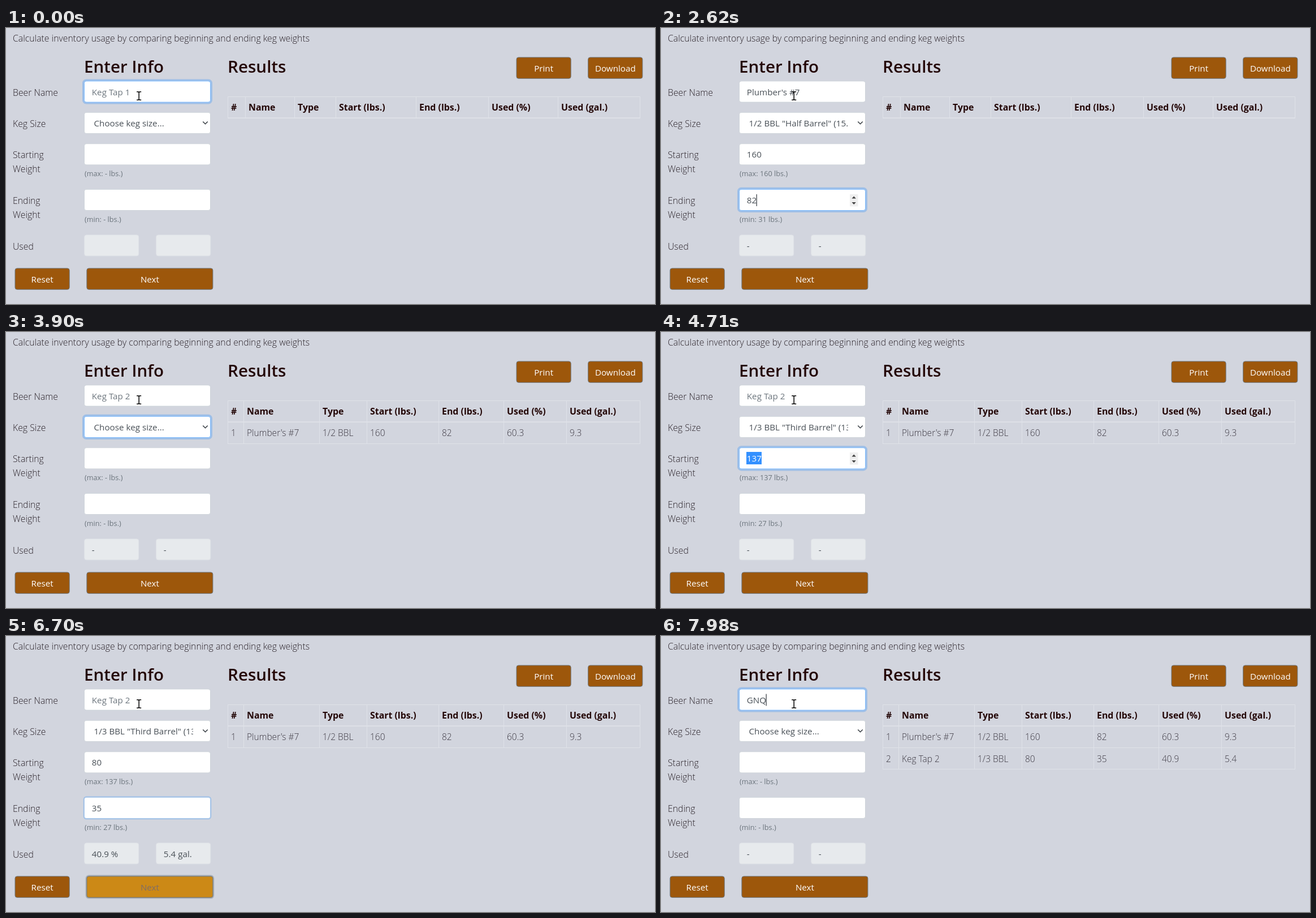
Recreate the animation shown at these times as an HTML page. Size 1148 by 488 pixels, loop 8000 ms.

```html
<!DOCTYPE html>
<html lang="en">
<head>
<meta charset="utf-8">
<title>Keg usage calculator</title>
<style>
  html, body { margin: 0; width: 100%; height: 100%; overflow: hidden; background: #d2d5de; }
  svg { display: block; }
  text { font: 400 15.2px "Open Sans", "Noto Sans", sans-serif; fill: #495057; white-space: pre; }
  .light { font-weight: 300; font-size: 15.8px; fill: #2a2229; }
  .cell { font-weight: 300; font-size: 15.5px; fill: #3e3a44; }
  .title { font-weight: 600; font-size: 29.6px; fill: #230606; }
  .head { font-weight: 700; font-size: 15.9px; fill: #230606; }
  .small { font-size: 12.7px; fill: #6c757d; }
  .btn { text-anchor: middle; fill: #fff; }
  .line { fill: none; stroke: #dfe2e8; }
</style>
</head>
<body>
<svg id="stage" width="1148" height="488" viewBox="0 0 1148 488">
  <defs><clipPath id="kegClip"><rect x="150" y="150" width="181" height="36"/></clipPath></defs>
</svg>
<script>
const stage = document.getElementById('stage');
const LOOP = 8000, BLINK = 210, TICK = 30;
const BEER = "Plumber's #7";

function add(tag, attrs, content, parent = stage) {
  const el = document.createElementNS('http://www.w3.org/2000/svg', tag);
  for (const key in attrs) el.setAttribute(key, attrs[key]);
  if (content) el.textContent = content;
  return parent.appendChild(el);
}
const label = (x, y, cls, content, parent) => add('text', { x, y, class: cls }, content, parent);
const show = (el, on) => el.setAttribute('visibility', on ? 'visible' : 'hidden');
const mix = (a, b, p) => `rgb(${a.map((v, i) => Math.round(v + (b[i] - v) * p))})`;

function box(x, y, width, height, fill, stroke, ringColor) {
  const shape = { x, y, width, height, rx: 4 };
  const ring = add('rect', { ...shape, fill: 'none', stroke: ringColor || 'none', 'stroke-width': 0 });
  const body = add('rect', {
    x: x + .5, y: y + .5, width: width - 1, height: height - 1, rx: 3.5, fill, stroke
  });
  return { ring, body };
}
const field = y => box(138, y, 224, 38.2, '#fff', '#ced4da', 'rgba(0,123,255,.25)');
function button(x, y, width, content) {
  const b = box(x, y, width, 38.4, '#9d570b', '#6c757d', 'rgba(130,138,145,.5)');
  b.text = label(x + width / 2, y + 25.6, 'btn', content);
  return b;
}

// Fixed labels
label(12, 24, 'light', 'Calculate inventory usage by comparing beginning and ending keg weights');
label(138, 79, 'title', 'Enter Info');
label(392, 79, 'title', 'Results');
[['Beer Name', 120], ['Keg Size', 175], ['Starting', 230], ['Weight', 255],
 ['Ending', 311], ['Weight', 336], ['Used', 392]].forEach(([s, y]) => label(12, y, 'light', s));

// Form
const fields = { name: field(93.4), keg: field(148.8), start: field(204.2), end: field(284.8) };
for (const x of [138.2, 265.2]) box(x, 365.4, 97, 38, '#e7eaed', '#dfe2e7');
button(15.5, 424.4, 97.2, 'Reset');
button(902.5, 51.4, 97.2, 'Print');
button(1029.2, 51.4, 97.2, 'Download');
fields.next = button(142.4, 424.4, 224, 'Next');

const mark = add('rect', { x: 151, y: 212, width: 27, height: 22, fill: '#3390ff' });
const texts = {
  name: label(151.8, 119),
  keg: label(155.5, 174),
  start: label(151.8, 229),
  end: label(151.8, 310),
  max: label(139, 262, 'small'),
  min: label(139, 343, 'small'),
  pct: label(151.8, 391),
  gal: label(278.8, 391)
};
texts.keg.setAttribute('clip-path', 'url(#kegClip)');
add('path', { d: 'M348.3 165.5l4.2 4.2 4.2-4.2', fill: 'none', stroke: '#343a40', 'stroke-width': 1.5 });

const spinner = add('g', {});
add('rect', { x: 334, y: 0, width: 14.5, height: 21.5, fill: '#efefef' }, '', spinner);
add('path', { d: 'M337.5 7.5l3.7-4 3.7 4zM337.5 14l3.7 4 3.7-4z', fill: '#404040' }, '', spinner);
const caret = add('rect', { width: 1.2, height: 21, fill: '#30363c' });

// Results table
function table(edges, bottoms) {
  const g = add('g', {});
  const last = bottoms[bottoms.length - 1];
  add('path', {
    class: 'line',
    d: `M392.5 121.5H1121.5V${last}H392.5Z` +
       edges.map(x => `M${x} 121.5V${last}`).join('') +
       bottoms.map(y => `M392.5 ${y}H1121.5`).join('')
  }, '', g);
  add('path', { class: 'line', 'stroke-width': 1.8, d: 'M392.5 159.2H1121.5' }, '', g);
  const cells = (y, cls, values) =>
    values.forEach((s, i) => label(i ? edges[i - 1] + 5.5 : 398, y, cls, s, g));
  cells(145.5, 'head', ['#', 'Name', 'Type', 'Start (lbs.)', 'End (lbs.)', 'Used (%)', 'Used (gal.)']);
  const rows = [
    ['1', BEER, '1/2 BBL', '160', '82', '60.3', '9.3'],
    ['2', 'Keg Tap 2', '1/3 BBL', '80', '35', '40.9', '5.4']
  ];
  rows.slice(0, bottoms.length - 1).forEach((r, i) => cells(184 + i * 38.7, 'cell', r));
  return g;
}
const wide = [420.5, 554.5, 638.5, 765.5, 880.5, 991.5];
const tables = [
  table([423.5, 510.5, 583.5, 725.5, 853.5, 976.5], [159.5]),
  table(wide, [159.5, 197.5]),
  table(wide, [159.5, 197.5, 235.5])
];

// Mouse pointer
add('path', {
  d: 'M231.2 112.8h2.8l1.2 1 1.2-1h2.8M235.2 113.5v13M231.2 127.2h2.8l1.2-1 1.2 1h2.8',
  fill: 'none', stroke: '#000', 'stroke-width': 1.5
});

// Timeline: each entry changes part of the form at its time
const HALF = { keg: '1/2 BBL "Half Barrel" (15.5 gal.)', start: '160', max: '160', min: '31', pct: '-', gal: '-' };
const THIRD = { keg: '1/3 BBL "Third Barrel" (13.2 gal.)', start: '137', max: '137', min: '27' };
const EMPTY = { name: '', keg: 'Choose keg size...', start: '', end: '', max: '-', min: '-' };
const steps = [
  [-BLINK, { ...EMPTY, focus: 'name', hint: 'Keg Tap 1', pct: '', gal: '', rows: 0 }],
  ...Array.from({ length: 11 }, (_, i) => [100 + 86 * i, { name: BEER.slice(0, i + 1) }]),
  [1370, { name: BEER }],
  [1550, { focus: 'keg' }],
  [1770, HALF],
  [2210, { focus: 'start', marked: true }],
  [2300, { focus: 'end', marked: false }],
  [2500, { end: '8' }],
  [2620, { end: '82' }],
  [2810, { focus: 'next', pct: '60.3 %', gal: '9.3 gal.' }],
  [3210, { ...EMPTY, focus: 'name', hint: 'Keg Tap 2', pct: '-', gal: '-', rows: 1 }],
  [3720, { focus: 'keg' }],
  [4030, HALF],
  [4340, THIRD],
  [4650, { focus: 'start', marked: true }],
  [5380, { start: '8', marked: false }],
  [5480, { start: '80' }],
  [5800, { focus: 'end' }],
  [6230, { end: '3' }],
  [6410, { end: '35', pct: '40.9 %', gal: '5.4 gal.' }],
  [6670, { focus: 'next' }],
  [6980, { ...EMPTY, focus: 'name', hint: 'Keg Tap 3', pct: '-', gal: '-', rows: 2 }],
  [7300, { name: 'G' }],
  [7430, { name: 'GN' }],
  [7560, { name: 'GNQ' }]
];

function stateAt(t) {
  const s = {};
  for (const [time, change] of steps) {
    if (time > t) break;
    if (change.focus) {
      s.previous = s.focus;
      s.focusTime = time;
    }
    Object.assign(s, change);
    s.last = time;
  }
  return s;
}

function paintFocus(id, p) {
  const { ring, body, text } = fields[id];
  ring.setAttribute('stroke-width', 6 * p);
  if (id === 'next') {
    body.setAttribute('fill', mix([157, 87, 11], [236, 171, 30], p));
    text.style.fill = mix([255, 255, 255], [40, 12, 4], p);
  } else {
    body.setAttribute('stroke', mix([206, 212, 218], [128, 189, 255], p));
  }
}

function render(t) {
  const s = stateAt(t);
  const p = [.05, .6][Math.floor((t - s.focusTime) / TICK)] ?? 1;
  for (const id in fields) paintFocus(id, id === s.focus ? p : id === s.previous ? 1 - p : 0);

  const values = { ...s, name: s.name || s.hint, max: `(max: ${s.max} lbs.)`, min: `(min: ${s.min} lbs.)` };
  for (const id in texts) {
    if (texts[id].textContent !== values[id]) texts[id].textContent = values[id];
  }
  texts.name.style.fill = s.name ? '#495057' : '#6c757d';
  texts.start.style.fill = s.marked ? '#fff' : '#495057';
  show(mark, s.marked);
  tables.forEach((g, i) => show(g, i === s.rows));

  const top = { name: 102.5, start: 213, end: 294 }[s.focus];
  const numeric = s.focus === 'start' || s.focus === 'end';
  show(spinner, numeric);
  if (numeric) spinner.setAttribute('transform', `translate(0 ${top})`);

  const lit = Math.floor((t - s.last) / BLINK) % 2 === 0;
  show(caret, top && lit && !s.marked);
  if (top) {
    const width = s[s.focus] ? texts[s.focus].getComputedTextLength() : 0;
    caret.setAttribute('x', 151.2 + width);
    caret.setAttribute('y', top);
  }
}

const begin = performance.now();
function frame() {
  render((performance.now() - begin) % LOOP);
  requestAnimationFrame(frame);
}
frame();
</script>
</body>
</html>
```
